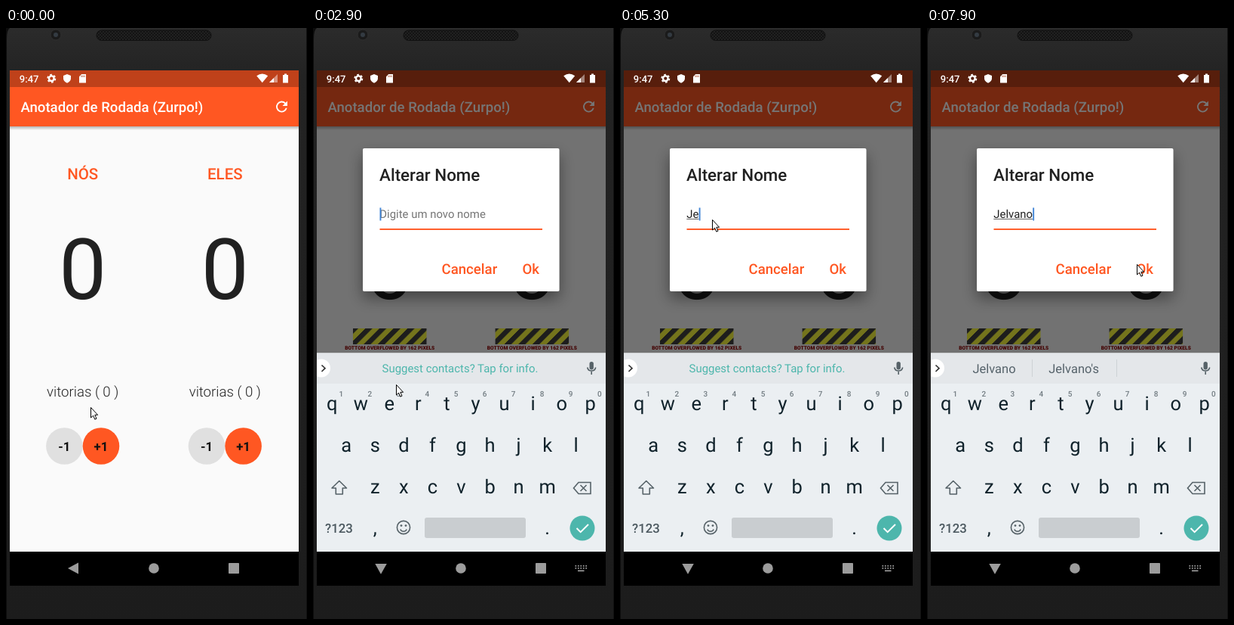
An HTML page that plays this animation: 399 px wide and 781 px high, repeating every 8 s.

```html
<!DOCTYPE html>
<html lang="pt">
<head>
<meta charset="utf-8">
<title>Placar</title>
<style>
  html, body { margin: 0; width: 100%; height: 100%; overflow: hidden; background: #1e1e1e; }
  svg { display: block; width: 100vw; height: 100vh; font-family: Roboto, sans-serif; text-rendering: geometricPrecision; }
  .mid { text-anchor: middle; }
  .medium { font-weight: 500; }
  .accent { fill: #ff5722; }
  .key { font-size: 25.5px; fill: #10222b; }
  .digit { font-size: 10px; font-weight: 500; fill: #717b81; }
  .word { font-size: 16.5px; fill: #56636b; }
  .word.best { font-weight: 700; fill: #0b0f11; }
  .line { fill: none; stroke: #566268; stroke-width: 1.6; }
</style>
</head>
<body>
<svg viewBox="0 0 399 781" preserveAspectRatio="none">
  <defs>
    <linearGradient id="shell" x2="0" y2="1">
      <stop offset="0" stop-color="#2b2b2b"/>
      <stop offset=".08" stop-color="#232323"/>
      <stop offset="1" stop-color="#1c1c1c"/>
    </linearGradient>
    <linearGradient id="barShade" x2="0" y2="1">
      <stop offset="0" stop-opacity=".28"/>
      <stop offset="1" stop-opacity="0"/>
    </linearGradient>
    <pattern id="mesh" width="4" height="4" patternUnits="userSpaceOnUse">
      <rect width="4" height="4" fill="#131313"/>
      <circle cx="1" cy="1" r=".8" fill="#333"/>
      <circle cx="3" cy="3" r=".8" fill="#333"/>
    </pattern>
    <pattern id="hazard" width="18.64" height="18.64" patternUnits="userSpaceOnUse" patternTransform="translate(56.34 0) skewX(-45)">
      <rect width="18.64" height="18.64" fill="#fefe3e"/>
      <rect width="9.32" height="18.64" fill="#3f3f3f"/>
    </pattern>
    <filter id="lift" x="-20%" y="-20%" width="140%" height="150%">
      <feDropShadow dx="0" dy="9" stdDeviation="10" flood-opacity=".42"/>
    </filter>
    <clipPath id="screen"><rect x="5" y="56" width="383" height="681"/></clipPath>
  </defs>

  <rect width="399" height="781" fill="url(#shell)"/>
  <path d="M0 0H5Q1 3 1 14V781H0Z" fill="#0c0c0c"/>
  <path d="M398 0H399V781H398Z" fill="#111"/>
  <circle cx="66" cy="9" r="7" fill="#1b1b1b" stroke="#303030"/>
  <circle cx="66" cy="9" r="3" fill="#333b42"/>
  <rect x="120" y="3" width="152" height="13.5" rx="6.7" fill="url(#mesh)" stroke="#111"/>

  <g clip-path="url(#screen)">
    <rect x="5" y="56" width="383" height="681" fill="#fafafa"/>
    <rect x="5" y="130" width="383" height="5" fill="url(#barShade)"/>
    <rect x="5" y="56" width="383" height="74" class="accent"/>
    <rect x="5" y="56" width="383" height="22" fill-opacity=".25"/>
    <text x="19.5" y="110.5" class="medium" font-size="18.64" fill="#fff">Anotador de Rodada (Zurpo!)</text>
    <path transform="translate(354.3 92.8) scale(.932)" fill="#fff" d="M17.65 6.35A8 8 0 1 0 19.73 14H17.65A6 6 0 1 1 16.22 7.78L13 11H20V4Z"/>
    <g id="teams"></g>

    <g id="modal">
      <rect x="5" y="56" width="383" height="636" fill-opacity=".54"/>
      <rect x="66" y="159" width="260.5" height="189" rx="2" fill="#fff" filter="url(#lift)"/>
      <text x="88" y="201.5" class="medium" font-size="22.4" fill="#212121">Alterar Nome</text>
      <text id="hint" x="88.3" y="251" font-size="14.91" fill="#757575">Digite um novo nome</text>
      <text id="typed" x="88.3" y="251" font-size="14.91" fill="#212121"></text>
      <rect id="composing" x="88.3" y="252" height="1" fill="#666"/>
      <rect id="caret" y="237.5" width="1.9" height="17" fill="#4285d6"/>
      <rect x="88.5" y="265" width="215.5" height="1.9" class="accent"/>
      <g class="accent medium" font-size="18.64">
        <text x="170.5" y="325">Cancelar</text>
        <text x="277.5" y="325">Ok</text>
      </g>

      <rect x="5" y="429.5" width="383" height="262.5" fill="#ebeff2"/>
      <rect x="5" y="429.5" width="383" height="40.5" fill="#e4e7ea"/>
      <circle cx="11" cy="449.5" r="12" fill="#fff"/>
      <path d="M11.5 445.5L16 449.7L11.5 454" fill="none" stroke="#333" stroke-width="1.7"/>
      <text id="tip" x="195" y="455" class="mid" font-size="14.95" fill="#4db6ac">Suggest contacts? Tap for info.</text>
      <g id="words">
        <path d="M139.5 438V461M251.5 438V461" stroke="#cdd2d5"/>
        <text class="word mid" x="89" y="456"></text>
        <text class="word mid" x="194.7" y="456"></text>
        <text class="word mid" x="300" y="456"></text>
      </g>
      <rect x="366.5" y="441" width="5.4" height="10.5" rx="2.7" fill="#566268"/>
      <path d="M363.7 448.5A5.6 5.6 0 0 0 374.7 448.5M369.2 454V458" class="line"/>
      <g id="keys"></g>
      <path d="M34.8 598.5L44.5 608H39.3V616H30.3V608H25Z" class="line" stroke-linejoin="round"/>
      <path d="M352 600.5H368V615.5H352L345.5 608ZM354.5 604L362.5 612M362.5 604L354.5 612" class="line"/>
      <text x="34.5" y="666.5" class="mid medium" font-size="16.8" fill="#4b585f">?123</text>
      <circle cx="120" cy="660" r="8.6" class="line"/>
      <path d="M115.8 662.5A4.6 4.6 0 0 0 124.2 662.5" class="line"/>
      <circle cx="117" cy="657.6" r="1.4" fill="#566268"/>
      <circle cx="123" cy="657.6" r="1.4" fill="#566268"/>
      <rect x="148" y="647" width="134" height="27" rx="3" fill="#c9cdd0"/>
      <circle cx="357" cy="661" r="16.5" fill="#4db6ac"/>
      <path d="M349.5 661L354.7 666.2L365 656" fill="none" stroke="#fff" stroke-width="2"/>
    </g>

    <g fill="#fff">
      <text x="17.8" y="71.5" class="medium" font-size="13">9:47</text>
      <circle cx="60.3" cy="66.7" r="3.3" fill="none" stroke="#fff" stroke-width="2.4"/>
      <circle cx="60.3" cy="66.7" r="5" fill="none" stroke="#fff" stroke-width="2" stroke-dasharray="2.6 2.636"/>
      <path d="M81 61L86 63V66.5Q86 70.5 81 72.7Q76 70.5 76 66.5V63Z"/>
      <path d="M100.2 61H106V72.5H97V64.3Z"/>
      <path d="M332.2 63.2Q339.7 57.8 347.2 63.2L339.7 72.3Z"/>
      <path d="M360 61V72H349Z" opacity=".45"/>
      <path d="M355 66V72H349Z"/>
      <path d="M367 62H369V60.5H372V62H374V72.5H367Z"/>
    </g>
    <path d="M100 62.5V65M102 62.5V65M104 62.5V65" stroke="#a23d1c" stroke-width=".8"/>

    <rect x="5" y="692" width="383" height="45"/>
    <g fill="#9c9c9c">
      <path id="back" d="M82 714L96 706.5V721.5Z"/>
      <path id="down" d="M82.3 708H97.8L90 721.7Z"/>
      <circle cx="196" cy="714" r="6.8"/>
      <rect x="295" y="707" width="14" height="14" rx=".8"/>
      <g id="imeIcon" stroke="#9c9c9c" stroke-width="1.7">
        <path d="M347.5 710.8H363M347.5 713.8H363" stroke-dasharray="1.7 1.75"/>
        <path d="M351 717.3H359.5"/>
      </g>
    </g>
  </g>
  <path id="mouse" d="M.5 .5V14L3.6 11.2L5.8 16.2L8 15.2L5.8 10.3H9.6Z" fill="#fff" stroke="#000"/>
</svg>

<script>
const $ = id => document.getElementById(id);
const show = (el, on) => { el.style.visibility = on ? 'visible' : 'hidden'; };
const text = (x, y, cls, s, attrs = '') => `<text x="${x}" y="${y}" class="mid ${cls}" ${attrs}>${s}</text>`;

const team = (cx, name) =>
  text(cx, 199.5, 'medium accent', name, 'font-size="20.5"') +
  text(cx, 357.5, '', '0', 'font-size="112" fill="#212121"') +
  text(cx, 487, '', 'vitorias ( 0 )', 'font-size="18.64" font-weight="300" fill="#212121"') +
  [[-24.3, '#e0e0e0', '-1'], [24.3, '#ff5722', '+1']].map(([dx, fill, label]) =>
    `<circle cx="${cx + dx}" cy="552.5" r="24.3" fill="${fill}"/>` +
    text(cx + dx, 558.5, '', label, 'font-size="16.78" font-weight="700" fill="#111"')).join('') +
  `<g class="overflow"><rect x="${cx - 48.7}" y="397" width="97.5" height="21" fill="url(#hazard)"/>` +
  text(cx, 424.5, '', 'BOTTOM OVERFLOWED BY 162 PIXELS', 'font-size="6.7" font-weight="800" fill="#900000"') + '</g>';
$('teams').innerHTML = team(101.7, 'NÓS') + team(290.3, 'ELES');

// Every row of letters is centred on the keyboard.
const keyStep = 38.05, keyCentre = 196.5;
const keyRow = (letters, y, cls = 'key', dx = 0) => [...letters].map((c, i) =>
  text(keyCentre + dx + (i - (letters.length - 1) / 2) * keyStep, y, cls, c)).join('');
$('keys').innerHTML =
  keyRow('1234567890', 487, 'digit', 12) + keyRow('qwertyuiop', 505) +
  keyRow('asdfghjkl', 560) + keyRow('zxcvbnm', 614.5) + keyRow(',     .', 668.5);

// All times below are in ticks of 100 ms.
const TICK = 100, LOOP = 80;
const NAME = 'Jelvano';
const keyTicks = [48, 53, 61, 65, 66, 67, 68];
const caretOff = [[30, 35], [40, 45], [58, 61], [73, 78]];
const suggestions = [
  [62, 'Jel', 'Jelly', 'Jellybean'],
  [65, 'Jelv', 'Jelvano', 'Jelvina'],
  [66, 'Jelva', 'Jelvano', 'Jelvana'],
  [67, 'Jelvan', 'Jelvano', 'Jelvana'],
  [68, 'Jelvano', "Jelvano's", '']
];
const mousePath = [
  [0, 112, 501], [12, 112, 501], [15, 109, 480], [28, 109, 480],
  [29, 110, 471], [35, 118, 299], [36, 118, 299], [37, 122, 253],
  [76, 122, 253], [77, 150, 264], [78, 238, 299], [79, 278, 312]
];

function mouseAt(tick) {
  const i = mousePath.findIndex(p => p[0] >= tick);
  if (i < 1) return mousePath[0].slice(1);
  const [t0, x0, y0] = mousePath[i - 1], [t1, x1, y1] = mousePath[i];
  const f = (tick - t0) / (t1 - t0);
  return [x0 + (x1 - x0) * f, y0 + (y1 - y0) * f].map(Math.round);
}

function render(tick) {
  const modal = tick >= 29, ime = tick >= 24;
  $('modal').style.display = modal ? '' : 'none';
  document.querySelectorAll('.overflow').forEach(el => show(el, modal));
  show($('back'), !ime);
  show($('down'), ime);
  show($('imeIcon'), ime);
  $('mouse').setAttribute('transform', `translate(${mouseAt(tick)})`);
  if (!modal) return;

  const typed = $('typed');
  typed.textContent = NAME.slice(0, keyTicks.filter(t => t <= tick).length);
  $('hint').style.opacity = Math.min(1, Math.max(0, (50 - tick) / 3));
  const width = typed.textContent ? typed.getComputedTextLength() : 0;
  $('composing').setAttribute('width', width);
  $('caret').setAttribute('x', 88.5 + width);
  show($('caret'), !caretOff.some(([a, b]) => tick >= a && tick < b));

  const current = suggestions.filter(s => s[0] <= tick).pop();
  $('tip').style.display = current ? 'none' : '';
  $('words').style.display = current ? '' : 'none';
  if (!current) return;
  const words = $('words').querySelectorAll('text');
  words.forEach((el, i) => { el.textContent = current[i + 1]; });
  words[1].classList.toggle('best', current[3] !== '');
}

let last = -1;
function frame() {
  const tick = Math.floor(performance.now() / TICK) % LOOP;
  if (tick !== last) render(last = tick);
  requestAnimationFrame(frame);
}
frame();
</script>
</body>
</html>
```
